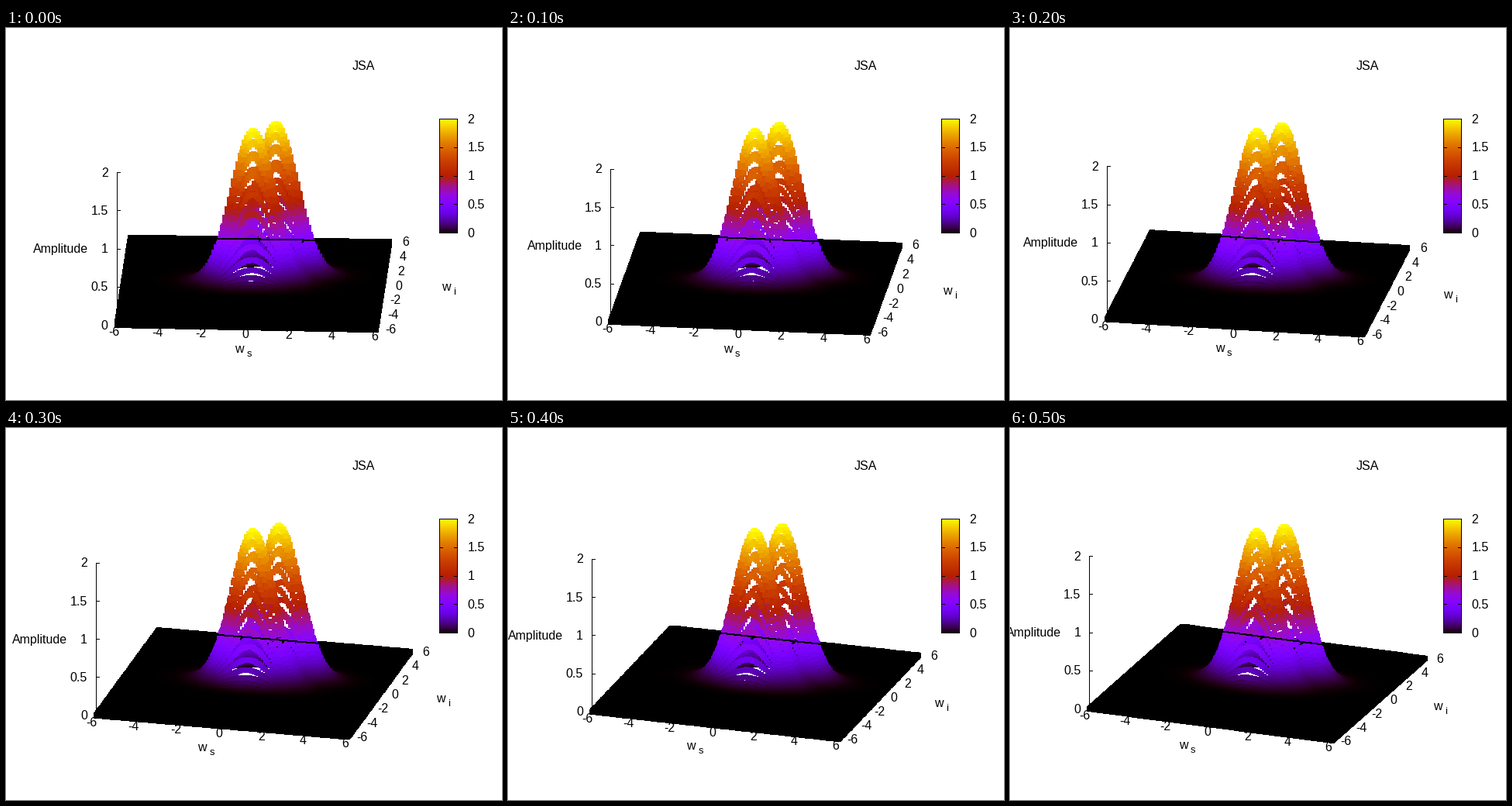
These frames come from a looping animation (640x480 px, 0.6 s). A matplotlib script:

```python
import matplotlib.pyplot as plt
import numpy as np
from matplotlib.animation import FuncAnimation
from matplotlib.collections import LineCollection

W, H, DPI = 640, 480, 100
PX = 72 / DPI                      # points per pixel
CX, CY = 318.5, 329.3              # screen centre of the floor
SX, SY, SZ = 167.25, 56.9, 98.5    # pixels per half width, half depth, unit height
MARKER = 7
TURN = 3.6                         # degrees per step
STEPS = 6

fig = plt.figure(figsize=(W / DPI, H / DPI), dpi=DPI, facecolor="white")
ax = fig.add_axes([0, 0, 1, 1])


def palette(g):
    """Black - violet - red - yellow ramp for g in 0..1."""
    g = np.clip(g, 0, 1)
    return np.stack([np.sqrt(g), g**3, np.clip(np.sin(2 * np.pi * g), 0, 1)], axis=-1)


def project(x, y, z, angle):
    u, v = x / 6, y / 6
    c, s = np.cos(angle), np.sin(angle)
    return CX + SX * (u * c + v * s), CY + SY * (u * s - v * c) - SZ * z


def text(x, y, s, ha="center", size=16):
    """Text whose capitals are centred on y."""
    ax.text(x, y + 0.345 * size, s, ha=ha, va="baseline", fontsize=size * PX,
            family="Liberation Sans", color="black")


def subscripted(x, y, sub):
    text(x, y - 0.5, "w")
    text(x + 9.3, y + 5.5, sub, "left", size=13)


def lines(segments):
    ax.add_collection(LineCollection(segments, colors="black", linewidths=PX,
                                     antialiaseds=False, zorder=3))


def bell(x, y):
    return 2 * np.exp(-x**2 / 2 - 2 * y**2)


# Two equal bells on a square grid, listed from back to front
ticks = np.linspace(-6, 6, 121)
gx, gy = (a.ravel() for a in np.meshgrid(ticks, ticks[::-1]))
gz = np.maximum(bell(gx, gy), bell(gx - 1, gy - 1))
colors = palette(gz / 2)


def draw_colorbar():
    left, right, top, bottom = 559, 582, 117, 264
    ramp = palette(np.linspace(1, 0, 148))[:, None]
    ax.imshow(ramp, extent=(left, right + 1, bottom + 1, top), aspect="auto", zorder=1)
    lines([[(left, top), (right, top), (right, bottom), (left, bottom), (left, top)]])
    for value in np.arange(0, 2.1, 0.5):
        y = bottom - (bottom - top) * value / 2
        lines([[(left, y), (left + 4, y)], [(right - 4, y), (right, y)]])
        text(595.5, y, f"{value:g}", "left")


def draw_axes(angle):
    c, s = np.cos(angle), np.sin(angle)
    corners = [project(x, y, 0, angle) for x, y in
               ((-6, -6), (6, -6), (6, 6), (-6, 6), (-6, -6))]
    zx, z0 = corners[0]
    lines([corners, [(zx, z0), (zx, z0 - 2 * SZ)]])

    for value in range(-6, 7, 2):
        bx, by = project(value, 6, 0, angle)
        lines([[(bx, by), (bx - 10 * s, by + 3.4 * c)]])
        shift = 0 if value < 0 else 4.4      # room kept for the sign
        fx, fy = project(value, -6, 0, angle)
        text(fx - 11 * s - 2.3 + shift / 2, fy + 8.7, f"{value}")
        rx, ry = project(6, value, 0, angle)
        text(rx + 12.3 * c + shift, ry + 4 * s - 0.5, f"{value}", "left")

    for value in np.arange(0, 2.1, 0.5):
        y = z0 - SZ * value
        lines([[(zx, y), (zx + 4, y)]])
        text(zx - 11, y, f"{value:g}", "right")
    text(zx - 72, z0 - SZ, "Amplitude")

    mx, my = project(0, -6, 0, angle)
    subscripted(mx - 4.4 - 85 * s, my + 28 * c, "s")
    mx, my = project(6, 0, 0, angle)
    subscripted(mx + 82.5 * c, my + 26 * s, "i")


def draw(step):
    ax.clear()
    ax.axis("off")
    angle = np.radians(int(TURN * (step + 1)))
    sx, sy = project(gx, gy, gz, angle)
    ax.scatter(np.round(sx) + 0.5, np.round(sy) + 0.5, s=(MARKER * PX)**2, c=colors,
               marker="s", linewidths=0, antialiased=False, zorder=2)
    draw_axes(angle)
    draw_colorbar()
    text(461.5, 48, "JSA")
    ax.set_xlim(0, W)
    ax.set_ylim(H, 0)
    return []


animation = FuncAnimation(fig, draw, frames=STEPS, init_func=lambda: [],
                          interval=100, repeat=True)
plt.show()
```
